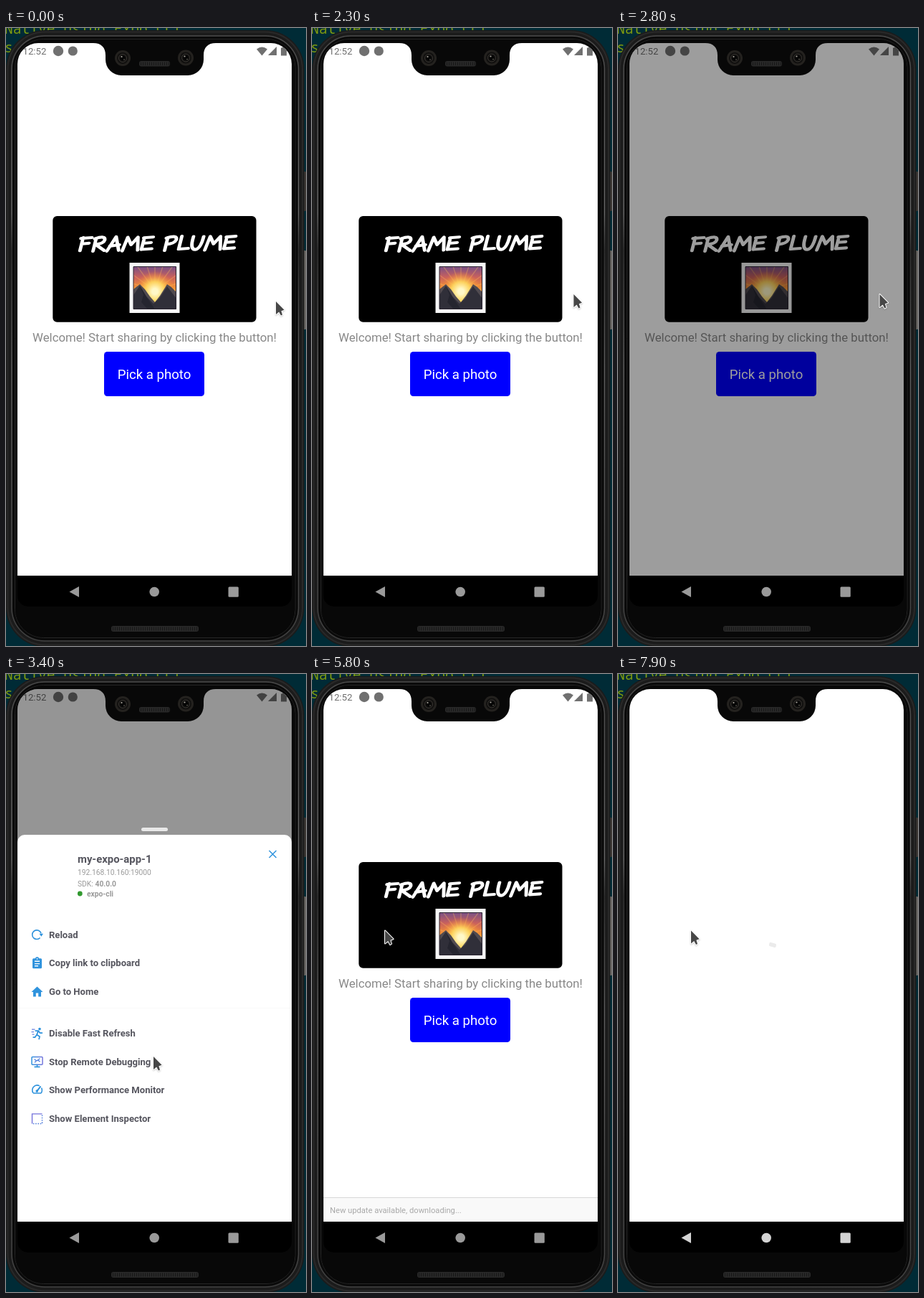
Animation, 419 px wide and 861 px high, one loop 8 s. Source, as an HTML page with a canvas:

```html
<!DOCTYPE html>
<html lang="en">
<head>
<meta charset="utf-8">
<title>Reloading an app from the developer menu</title>
<style>
  html, body { margin: 0; width: 100%; height: 100%; overflow: hidden; background: #002b36; }
  canvas { display: block; width: 419px; height: 861px; }
</style>
</head>
<body>
<canvas id="stage" aria-label="Phone showing the Frame Plume app"></canvas>
<script>
const W = 419, H = 861, LOOP = 8000, STEP = 100;
const SCREEN = { x: 16, y: 21, w: 383, h: 785 };
const NAV_Y = 763;
const BLUE = '#2f93dd', INK = '#55555e', GREY = '#999';
const canvas = document.getElementById('stage');
const ctx = canvas.getContext('2d');
const dpr = window.devicePixelRatio || 1;
canvas.width = W * dpr;
canvas.height = H * dpr;

// ---- helpers ----
function rect(x, y, w, h, color, r = 0) {
  ctx.fillStyle = color;
  ctx.beginPath();
  ctx.roundRect(x, y, w, h, r);
  ctx.fill();
}
function frame(x, y, w, h, color, r, width) {
  ctx.strokeStyle = color;
  ctx.lineWidth = width;
  ctx.beginPath();
  ctx.roundRect(x, y, w, h, r);
  ctx.stroke();
}
function disc(x, y, r, color) {
  ctx.fillStyle = color;
  ctx.beginPath();
  ctx.arc(x, y, r, 0, Math.PI * 2);
  ctx.fill();
}
function ring(x, y, r, color, width = 1, from = 0, to = Math.PI * 2) {
  ctx.strokeStyle = color;
  ctx.lineWidth = width;
  ctx.beginPath();
  ctx.arc(x, y, r, from, to);
  ctx.stroke();
}
function fill(d, color) {
  ctx.fillStyle = color;
  ctx.fill(new Path2D(d));
}
function line(d, color, width) {
  ctx.strokeStyle = color;
  ctx.lineWidth = width;
  ctx.stroke(new Path2D(d));
}
function text(str, x, y, size, color, weight = 400, align = 'left') {
  ctx.font = `${weight} ${size}px Roboto, sans-serif`;
  ctx.fillStyle = color;
  ctx.textAlign = align;
  ctx.fillText(str, x, y);
}
function gradient(x0, y0, x1, y1, stops) {
  const g = ctx.createLinearGradient(x0, y0, x1, y1);
  stops.forEach(([at, color]) => g.addColorStop(at, color));
  return g;
}
function layer(draw) {
  ctx.save();
  draw();
  ctx.restore();
}
const clamp = v => Math.min(1, Math.max(0, v));

// ---- phone ----
function backdrop() {
  rect(0, 0, W, H, '#002b36');
  ctx.font = '19.6px "Noto Sans Mono", monospace';
  ctx.textAlign = 'left';
  ctx.fillStyle = '#7f9a10';
  ctx.fillText('Native Using Expo CLI', -2, 8);
  ctx.fillText('s', -2, 34);
}
function body() {
  rect(414, 200, 5, 55, '#3b3733', 1);
  rect(414, 310, 5, 110, '#6b6865', 1);
  rect(0, 3, 416.5, 859, '#1b1b1b', 54);
  frame(2.5, 5.5, 411.5, 854, '#292929', 52, 2);
  const sheen = gradient(0, 0, 0, H, [[0, '#484848'], [.3, '#6a6a6a'], [.36, '#303030'], [.55, '#606060'], [1, '#404040']]);
  frame(8, 11, 400.5, 843, sheen, 46, 1.4);
  rect(9, 12, 398.5, 841, '#0a0a0a', 45);
  frame(12.5, 15.5, 391.5, 834, '#262626', 40, 1);
  rect(13, 16, 390.5, 833, '#080808', 39);
  grill(147, 833, 122, 8);
}
function grill(x, y, w, h) {
  rect(x, y, w, h, '#282828', 3);
  for (let i = 2; i < w - 1; i += 3) {
    rect(x + i, y + 1.5, 1, h - 3, '#171717');
  }
}
function lens(x, y) {
  disc(x, y, 11, '#24221f');
  disc(x, y, 8, '#11100f');
  ring(x, y, 5.5, '#383531', 1);
  disc(x, y, 3.5, '#050505');
  disc(x - 1.5, y - 2, 1.1, '#aaa69d');
  disc(x + 2, y + 2, .8, '#77736a');
}
function notch() {
  fill('M122 20V21C133 21 139 27 139 38V44A22 22 0 0 0 161 66H254A22 22 0 0 0 276 44V38C276 27 282 21 293 21V20Z', '#080808');
  lens(163, 42);
  lens(251, 41.5);
  grill(186, 46, 43, 7.5);
}
function status() {
  const c = '#707070';
  text('12:52', 23.5, 37, 13.2, c);
  disc(73, 32, 7.2, c);
  disc(93.3, 32, 6.6, c);
  fill('M350 29.5Q357.5 23.5 365 29.5L357.5 38.5Z', c);
  fill('M378 26V38H366Z', c);
  fill('M384 27.5H386V26H390V27.5H392V38.5H384Z', c);
}
function navIcons(color) {
  fill('M102 778V793L88.5 785.5Z', color);
  disc(207.2, 785.5, 6.8, color);
  rect(310.5, 778.5, 14.3, 14.3, color, 1.5);
}

// ---- app ----
const GLYPHS = {
  F: [18, 'M4 2L2 23M1 3L16 2M3 12L13 11'],
  R: [20, 'M4 3L2 24M2 4Q16 -2 16 6Q15 12 4 13L17 23'],
  A: [21, 'M1 24L11 1L17 23M4 16L17 14'],
  M: [25, 'M1 24L6 2L12 14L20 2L22 23'],
  E: [18, 'M4 3L2 22M3 3L16 2M3 12L14 11M2 22L16 21'],
  P: [19, 'M4 3L2 24M2 4Q17 -2 16 7Q14 13 4 14'],
  L: [17, 'M4 1L2 22L15 21'],
  U: [20, 'M3 2Q0 23 8 23Q15 22 17 2'],
  ' ': [14, '']
};
function marker(str, x, y) {
  layer(() => {
    ctx.transform(1.02, -.01, -.12, .86, x + 3, y);
    ctx.lineCap = ctx.lineJoin = 'round';
    for (const ch of str) {
      const [advance, d] = GLYPHS[ch];
      line(d, '#fff', 4.8);
      ctx.translate(advance, 0);
    }
  });
}
function picture() {
  rect(172.5, 327, 70, 70, '#f7f7f7');
  layer(() => {
    ctx.beginPath();
    ctx.rect(178, 332.5, 59.5, 59);
    ctx.clip();
    rect(178, 332, 60, 60, gradient(0, 332, 0, 375, [[0, '#755087'], [.35, '#c9605d'], [.7, '#f39235'], [1, '#ffd35a']]));
    const sun = ctx.createRadialGradient(208, 367, 4, 208, 367, 28);
    sun.addColorStop(0, '#fff8c8');
    sun.addColorStop(.4, 'rgba(255,217,95,.9)');
    sun.addColorStop(1, 'rgba(255,140,40,0)');
    for (let i = 0; i < 11; i++) {
      const a = Math.PI * (1 + i / 10);
      line(`M208 366L${208 + 42 * Math.cos(a)} ${366 + 42 * Math.sin(a)}`, 'rgba(255,190,90,.35)', 1.3);
    }
    rect(178, 332, 60, 60, sun);
    fill('M178 364L187 357L194 364L201 374L208 382L215 373L225 357L231 361L238 368V392H178Z', '#514b50');
    fill('M178 372L187 359L196 374L206 384L214 377L225 360L238 377V392H178Z', '#302f39');
    fill('M187 359L192 372L189 382L198 392H208L196 374Z', '#25252f');
  });
  frame(178, 332.5, 59.5, 59, '#2a2430', 0, 1);
}
function home() {
  rect(16, 21, 383, 742, '#fff');
  rect(65.3, 262, 284.2, 147.8, '#000', 6);
  marker('FRAME PLUME', 101, 290.5);
  picture();
  text('Welcome! Start sharing by clicking the button!', 207.5, 437, 16.78, '#888', 400, 'center');
  rect(137, 451, 140, 62, '#00f', 4.6);
  text('Pick a photo', 207, 489.2, 18.64, '#fff', 400, 'center');
}
function banner() {
  rect(16, 729, 383, 34, '#f9f9f9');
  rect(16, 729, 383, 1, '#d8d8d8');
  text('New update available, downloading...', 25, 750.7, 11.18, '#a9a9a9');
}
function blank() {
  rect(16, 21, 383, 742, '#fff');
}

// ---- developer menu; icons are drawn around 0,0 ----
const ICONS = {
  reload() {
    ring(-.5, 0, 6.3, BLUE, 1.6, .75, 5.95);
    fill('M3 -1.5H8.5L5.8 2.5Z', BLUE);
  },
  clipboard() {
    rect(-6.5, -6.5, 13, 14, BLUE, 1.5);
    rect(-2.5, -8.5, 5, 4, BLUE, 2);
    line('M-3.5 -2.5H3.5M-3.5 .8H3.5M-3.5 4H1.5', '#fff', 1.4);
    disc(0, -6, .9, '#fff');
  },
  home() {
    fill('M0 -7L8 .5H5.5V7H1.7V2H-1.7V7H-5.5V.5H-8Z', BLUE);
  },
  run() {
    disc(3.5, -6, 1.8, BLUE);
    line('M-3 -3.5L1.5 -3.5L-.5 2L3.5 4.5L2.5 8.5M-.5 2L-3 5.5L-6 5.5M1.5 -3.5L4 -.5H7.5', BLUE, 1.8);
    line('M-7.5 -5.5H-3M-8 -2H-4.5M-7 1.5H-4', '#6a83df', 1.2);
  },
  screen() {
    frame(-7.5, -6.8, 15, 10.8, gradient(-8, 0, 8, 0, [[0, BLUE], [1, '#7776dc']]), 1, 1.5);
    line('M0 4V7M-4 7.2H4', BLUE, 1.6);
    line('M-4 -3.5L-1 -1.5L-3.5 1M4 -4.5L1 -2.5L4 0M-1 -1.5H1', '#527fdc', 1.3);
  },
  gauge() {
    ring(0, 0, 6.8, BLUE, 1.6, 2.5, 5.2);
    ring(0, 0, 6.8, BLUE, 1.6, 5.8, 6.95);
    line('M-5.5 4.3H5.5', BLUE, 1.5);
    line('M-.5 1.5L5 -5.5', BLUE, 2);
    disc(-.3, 1.3, 1.8, BLUE);
  },
  inspector() {
    line('M-7 7V-6.5H7', '#7573dc', 1.4);
    layer(() => {
      ctx.setLineDash([1.6, 1.7]);
      line('M7 -5V7H-6', '#527fdc', 1.5);
    });
  }
};
const ROWS = [
  ['reload', 'Reload', 363.2],
  ['clipboard', 'Copy link to clipboard', 402.8],
  ['home', 'Go to Home', 442.4],
  ['run', 'Disable Fast Refresh', 500.6],
  ['screen', 'Stop Remote Debugging', 540.2],
  ['gauge', 'Show Performance Monitor', 579.8],
  ['inspector', 'Show Element Inspector', 619.4]
];
function appIcon() {
  rect(36, 255, 48, 48, '#f4f6f5');
  for (let i = 0; i <= 8; i++) {
    line(`M${36 + i * 6} 255V303M36 ${255 + i * 6}H84`, '#e6e9e8', .6);
  }
  line('M36 255L84 303M84 255L36 303', '#e1e5e3', .6);
  [8, 15, 20].forEach(r => ring(60, 279, r, '#c8cccb', .8));
}
function menu(t) {
  rect(189, 214, 37, 5, '#e8e8e8', 2.5);
  rect(16, 224, 383, 560, '#fff', [10, 10, 0, 0]);
  line('M367.5 246L377.5 256M377.5 246L367.5 256', BLUE, 1.5);
  if (t >= 3700) appIcon();
  text('my-expo-app-1', 100, 262.6, 14.9, INK, 700);
  text('192.168.10.160:19000', 100, 280, 10.25, GREY);
  text('SDK: ', 100, 296, 10.25, GREY);
  text('40.0.0', 124.5, 296, 10.25, GREY, 700);
  disc(103.3, 306, 3.4, '#31992f');
  text('expo-cli', 113, 310, 10.25, GREY, 700);
  rect(16, 465, 383, 1, '#fafafa');
  for (const [icon, label, y] of ROWS) {
    layer(() => {
      if (icon === 'reload' && t >= 4500) ctx.globalAlpha = .2;
      text(label, 60, y + 4.5, 13.05, INK, 700);
      ctx.translate(43.5, y);
      ICONS[icon]();
    });
  }
  if (t >= 4900) banner();
}

// ---- scenes ----
function appScene(t) {
  rect(16, NAV_Y, 383, 43, '#000');
  home();
  if (t >= 5800) banner();
  status();
  if (t >= 2700 && t < 5800) {
    const dim = t < 2800 ? .2 : t < 2900 ? .385 : .415;
    rect(16, 21, 383, 742, `rgba(0,0,0,${dim})`);
    layer(() => {
      ctx.beginPath();
      ctx.rect(16, 21, 383, 742);
      ctx.clip();
      ctx.translate(0, 560 * Math.pow(1 - clamp((t - 2800) / 500), 3));
      menu(t);
    });
  }
}
function card(left, scale, draw) {
  layer(() => {
    ctx.translate(left, 388);
    ctx.scale(scale, scale);
    ctx.translate(-16, -388);
    rect(16, 21, 383, 786, '#000');
    draw();
  });
}
function switchScene(t) {
  rect(16, 21, 383, 786, gradient(0, 21, 0, 807, [
    [0, '#f2aeca'], [.3, '#ec9dc0'], [.54, '#cf709d'], [.68, '#b34c72'],
    [.77, '#8c2d60'], [.81, '#45186a'], [.86, '#2c0747'], [1, '#2b0638']
  ]));
  const scale = t < 7100 ? .97 : .985;
  const rest = 207.5 - 191.5 * scale;
  const left = t < 6800 ? 247 : rest;
  card(left - 390, scale, () => { home(); banner(); });
  card(left, scale, blank);
  status();
}
function loadScene(t) {
  rect(16, NAV_Y, 383, 43, '#000');
  blank();
  if (t < 7900) return;
  layer(() => {
    ctx.translate(216, 377.5);
    ctx.rotate(.3);
    rect(-5, -2.7, 10, 5.4, '#ebebeb', 1.8);
  });
}

// ---- pointer ----
const PATH = [
  [0, 377, 381], [400, 377, 381], [800, 367, 386], [1100, 367, 386], [1200, 365.5, 371],
  [2800, 365.5, 371], [3400, 206, 533], [3500, 206, 533], [4300, 102, 357.5], [LOOP, 102, 357.5]
];
function pointerAt(t) {
  const i = PATH.findIndex(key => key[0] > t);
  const [t0, x0, y0] = PATH[i - 1], [t1, x1, y1] = PATH[i];
  const p = (t - t0) / (t1 - t0);
  const e = p * p * (3 - 2 * p);
  return [x0 + (x1 - x0) * e, y0 + (y1 - y0) * e];
}
function pointer(t) {
  layer(() => {
    ctx.translate(...pointerAt(t));
    const d = 'M0 0V18L4.2 14.6L7 19.6L9 18.4L7.4 13.2L11.6 11.8Z';
    ctx.shadowColor = 'rgba(0,0,0,.2)';
    ctx.shadowBlur = 2 * dpr;
    ctx.shadowOffsetY = dpr;
    ctx.lineJoin = 'round';
    line(d, '#fff', 2);
    ctx.shadowColor = 'transparent';
    fill(d, '#474747');
  });
}
function pinchDots() {
  [[365.5, 371.5], [48.5, 456.5]].forEach(([x, y]) => {
    disc(x, y, 20, 'rgba(130,130,130,.45)');
    ring(x, y, 19.5, 'rgba(100,100,100,.5)', 1);
  });
}

function render(t) {
  ctx.setTransform(dpr, 0, 0, dpr, 0, 0);
  backdrop();
  body();
  layer(() => {
    ctx.beginPath();
    ctx.roundRect(SCREEN.x, SCREEN.y, SCREEN.w, SCREEN.h, [29, 29, 15, 15]);
    ctx.clip();
    if (t < 6700) appScene(t);
    else if (t < 7200) switchScene(t);
    else loadScene(t);
    navIcons(t < 7900 ? '#9a9a9a' : '#d4d4d4');
  });
  notch();
  if (t >= 1800 && t < 2300) pinchDots();
  pointer(t);
}

const start = performance.now();
function tick() {
  const t = (performance.now() - start) % LOOP;
  render(Math.floor(t / STEP) * STEP);
  requestAnimationFrame(tick);
}
tick();
</script>
</body>
</html>
```
